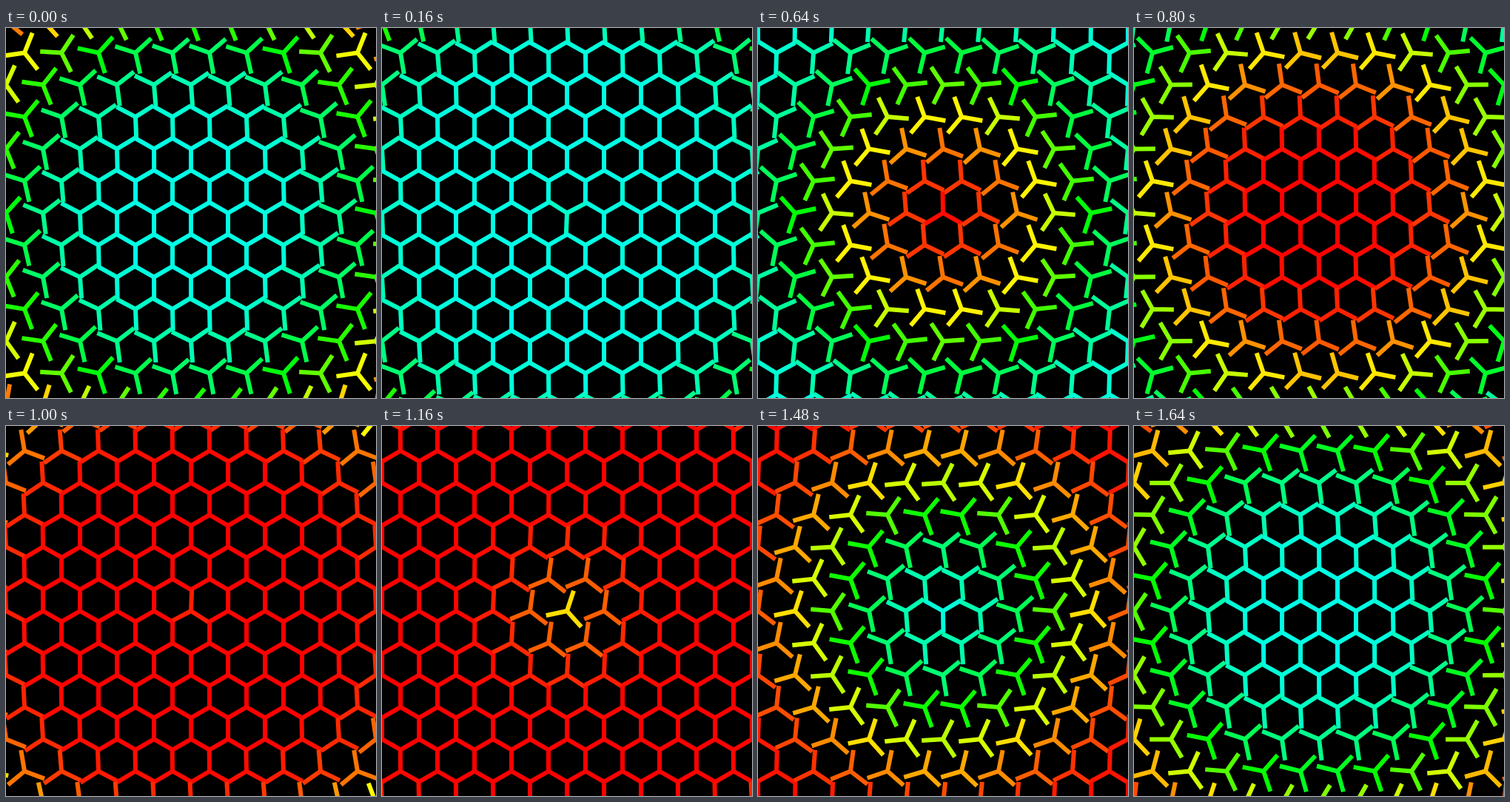
Animation, 500 px wide and 500 px high, one loop 1680 ms. Source, as an HTML page without scripts:

```html
<!DOCTYPE html>
<html lang="en">
<head>
<meta charset="utf-8">
<title>Honeycomb ripple</title>
<style>
  @property --turn {
    syntax: "<number>";
    inherits: false;
    initial-value: 0;
  }

  html, body {
    margin: 0;
    height: 100%;
    overflow: hidden;
    background: #000;
  }

  svg {
    display: block;
    width: 100%;
    height: 100%;
  }

  /* Each row sets --row; odd rows sit half a cell to the left. */
  g { --shift: 0; }
  g:nth-of-type(even) { --shift: -25; }

  use {
    --x: calc(var(--col) * 50 + var(--shift) - 250);
    --y: calc(var(--row) * 43.3);
    /* 0 = cyan, 1 = red, 2 = cyan again */
    stroke: hsl(calc(174 * max(1 - var(--turn), var(--turn) - 1)) 100% 50%);
    stroke-width: 6;
    transform:
      translate(calc(var(--x) * 1px), calc(var(--y) * 1px))
      rotate(calc(var(--turn) * 60deg));
    animation: turn 1680ms infinite;
    animation-delay: calc(hypot(var(--x), var(--y)) * 1.6ms - 1680ms);
  }

  use:nth-child(1) { --col: 0; }
  use:nth-child(2) { --col: 1; }
  use:nth-child(3) { --col: 2; }
  use:nth-child(4) { --col: 3; }
  use:nth-child(5) { --col: 4; }
  use:nth-child(6) { --col: 5; }
  use:nth-child(7) { --col: 6; }
  use:nth-child(8) { --col: 7; }
  use:nth-child(9) { --col: 8; }
  use:nth-child(10) { --col: 9; }
  use:nth-child(11) { --col: 10; }
  use:nth-child(12) { --col: 11; }

  /* Two cubic in-out turns, each followed by a short rest */
  @keyframes turn {
    0% { --turn: 0; animation-timing-function: cubic-bezier(.3333, 0, .6667, 0); }
    22.619% { --turn: .5; animation-timing-function: cubic-bezier(.3333, 1, .6667, 1); }
    45.238% { --turn: 1; }
    50% { --turn: 1; animation-timing-function: cubic-bezier(.3333, 0, .6667, 0); }
    72.619% { --turn: 1.5; animation-timing-function: cubic-bezier(.3333, 1, .6667, 1); }
    95.238%, 100% { --turn: 2; }
  }
</style>
</head>
<body>
<svg viewBox="-250 -250 500 500">
  <defs><path id="y" d="M0 0V28.87M0 0L-25 -14.43M0 0L25 -14.43"/></defs>
  <g style="--row:-6"><use href="#y"/><use href="#y"/><use href="#y"/><use href="#y"/><use href="#y"/><use href="#y"/><use href="#y"/><use href="#y"/><use href="#y"/><use href="#y"/><use href="#y"/><use href="#y"/></g>
  <g style="--row:-5"><use href="#y"/><use href="#y"/><use href="#y"/><use href="#y"/><use href="#y"/><use href="#y"/><use href="#y"/><use href="#y"/><use href="#y"/><use href="#y"/><use href="#y"/><use href="#y"/></g>
  <g style="--row:-4"><use href="#y"/><use href="#y"/><use href="#y"/><use href="#y"/><use href="#y"/><use href="#y"/><use href="#y"/><use href="#y"/><use href="#y"/><use href="#y"/><use href="#y"/><use href="#y"/></g>
  <g style="--row:-3"><use href="#y"/><use href="#y"/><use href="#y"/><use href="#y"/><use href="#y"/><use href="#y"/><use href="#y"/><use href="#y"/><use href="#y"/><use href="#y"/><use href="#y"/><use href="#y"/></g>
  <g style="--row:-2"><use href="#y"/><use href="#y"/><use href="#y"/><use href="#y"/><use href="#y"/><use href="#y"/><use href="#y"/><use href="#y"/><use href="#y"/><use href="#y"/><use href="#y"/><use href="#y"/></g>
  <g style="--row:-1"><use href="#y"/><use href="#y"/><use href="#y"/><use href="#y"/><use href="#y"/><use href="#y"/><use href="#y"/><use href="#y"/><use href="#y"/><use href="#y"/><use href="#y"/><use href="#y"/></g>
  <g style="--row:0"><use href="#y"/><use href="#y"/><use href="#y"/><use href="#y"/><use href="#y"/><use href="#y"/><use href="#y"/><use href="#y"/><use href="#y"/><use href="#y"/><use href="#y"/><use href="#y"/></g>
  <g style="--row:1"><use href="#y"/><use href="#y"/><use href="#y"/><use href="#y"/><use href="#y"/><use href="#y"/><use href="#y"/><use href="#y"/><use href="#y"/><use href="#y"/><use href="#y"/><use href="#y"/></g>
  <g style="--row:2"><use href="#y"/><use href="#y"/><use href="#y"/><use href="#y"/><use href="#y"/><use href="#y"/><use href="#y"/><use href="#y"/><use href="#y"/><use href="#y"/><use href="#y"/><use href="#y"/></g>
  <g style="--row:3"><use href="#y"/><use href="#y"/><use href="#y"/><use href="#y"/><use href="#y"/><use href="#y"/><use href="#y"/><use href="#y"/><use href="#y"/><use href="#y"/><use href="#y"/><use href="#y"/></g>
  <g style="--row:4"><use href="#y"/><use href="#y"/><use href="#y"/><use href="#y"/><use href="#y"/><use href="#y"/><use href="#y"/><use href="#y"/><use href="#y"/><use href="#y"/><use href="#y"/><use href="#y"/></g>
  <g style="--row:5"><use href="#y"/><use href="#y"/><use href="#y"/><use href="#y"/><use href="#y"/><use href="#y"/><use href="#y"/><use href="#y"/><use href="#y"/><use href="#y"/><use href="#y"/><use href="#y"/></g>
  <g style="--row:6"><use href="#y"/><use href="#y"/><use href="#y"/><use href="#y"/><use href="#y"/><use href="#y"/><use href="#y"/><use href="#y"/><use href="#y"/><use href="#y"/><use href="#y"/><use href="#y"/></g>
</svg>
</body>
</html>
```
